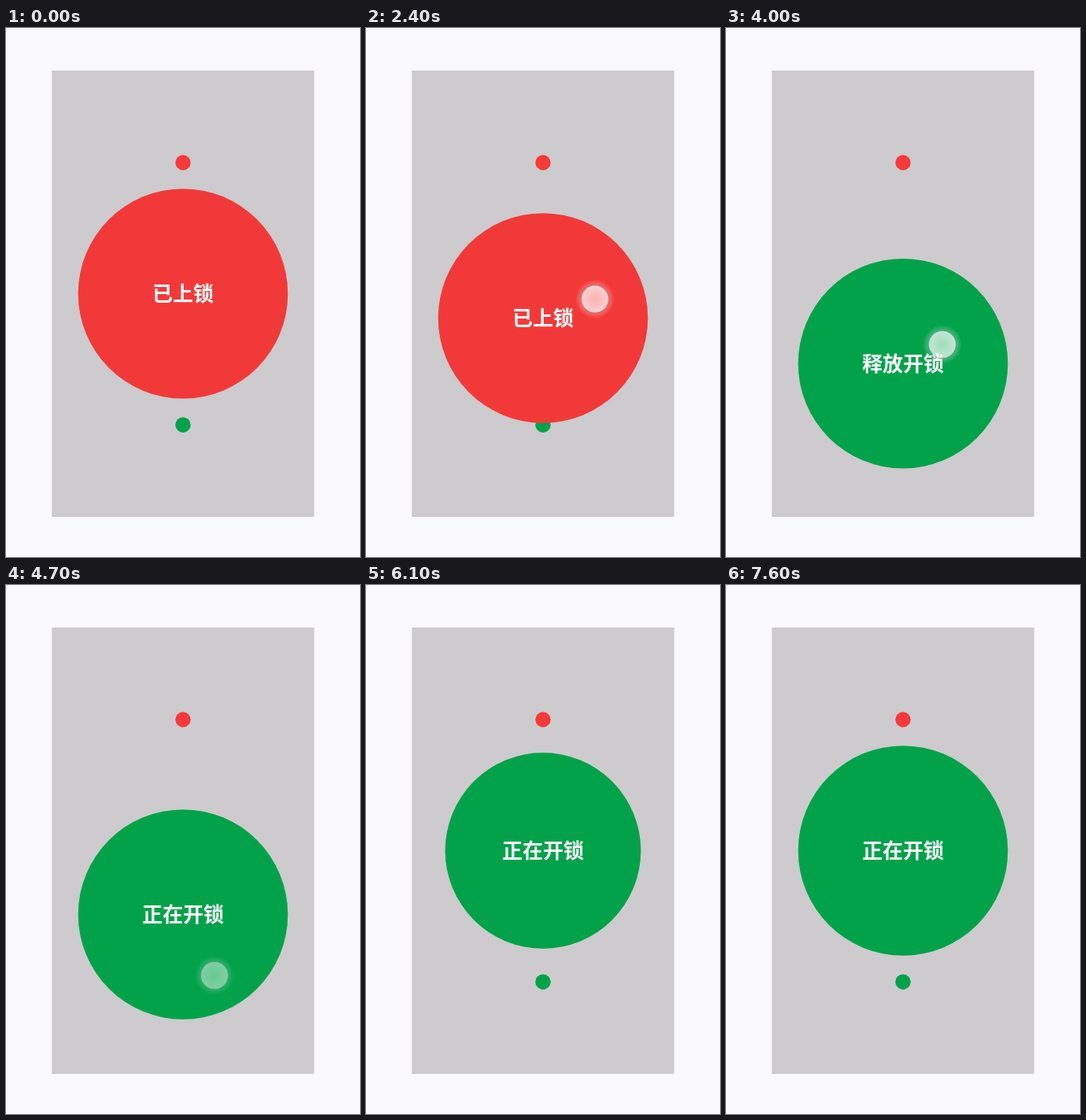
These frames come from a looping animation (450x672 px, 8 s). An HTML page with a canvas:

```html
<!DOCTYPE html>
<html lang="zh-CN">
<head>
<meta charset="utf-8">
<style>
  html, body { margin: 0; width: 450px; height: 672px; overflow: hidden; background: #faf9fc; }
  canvas { display: block; }
</style>
</head>
<body>
<canvas id="stage" width="450" height="672"></canvas>
<script>
const ctx = document.getElementById('stage').getContext('2d');

const LOOP = 8000, STEP = 100;
const RED = '#f23939', GREEN = '#02a24a';
const CX = 225, CY = 337.5, RADIUS = 133.3;
const MAX_PULL = 88.9, UNLOCK_PULL = 44.4;
const PRESS = 1700, RELEASE = 4580, RETURNED = 5200, DONE = 7600, PULSE = 600;
const GRAB_Y = 313.3; // finger height at which the pull is zero

// time, x, y
const touchPath = [
  [1700, 294, 321], [2400, 291, 344.3], [2500, 290.4, 348],
  [3400, 284, 372], [4000, 275, 402], [4600, 265, 496]
];

const clamp = (v, lo, hi) => Math.min(hi, Math.max(lo, v));
const wave = p => (1 - Math.cos(Math.PI * p)) / 2;

function fingerAt(t) {
  const time = clamp(t, touchPath[0][0], touchPath[touchPath.length - 1][0]);
  const i = touchPath.findIndex((p, n) => n > 0 && time <= p[0]);
  const [a, b] = [touchPath[i - 1], touchPath[i]];
  const k = (time - a[0]) / (b[0] - a[0]);
  return { x: a[1] + (b[1] - a[1]) * k, y: a[2] + (b[2] - a[2]) * k };
}

function pullAt(t) {
  if (t < PRESS) return 0;
  if (t < RELEASE) return clamp(fingerAt(t).y - GRAB_Y, 0, MAX_PULL);
  return MAX_PULL * (1 - wave(clamp((t - RELEASE) / (RETURNED - RELEASE), 0, 1)));
}

function radiusAt(t) {
  if (t < RETURNED || t >= DONE) return RADIUS;
  return RADIUS - 8.9 * wave((t - RETURNED) / PULSE * 2);
}

function disc(x, y, r, fill) {
  ctx.fillStyle = fill;
  ctx.beginPath();
  ctx.arc(x, y, r, 0, 2 * Math.PI);
  ctx.fill();
}

function radial(x, y, r0, r1, from, to) {
  const g = ctx.createRadialGradient(x, y, r0, x, y, r1);
  g.addColorStop(0, from);
  g.addColorStop(1, to);
  return g;
}

function drawFinger(t) {
  const alpha = 1 - clamp((t - 4600) / 250, 0, 1);
  if (t < PRESS || alpha === 0) return;
  const { x, y } = fingerAt(t);
  ctx.globalAlpha = alpha;
  disc(x, y, 25, radial(x, y, 17, 25, 'rgba(255,255,255,.28)', 'rgba(255,255,255,0)'));
  disc(x, y, 17.5, radial(x, y, 0, 17.5, 'rgba(255,255,255,.48)', 'rgba(255,255,255,.66)'));
  ctx.strokeStyle = 'rgba(90,95,130,.4)';
  ctx.lineWidth = 1.3;
  ctx.stroke();
  ctx.globalAlpha = 1;
}

function draw(t) {
  const pull = pullAt(t);
  const released = t >= RELEASE;
  const armed = released || pull >= UNLOCK_PULL;
  const label = released ? '正在开锁' : armed ? '释放开锁' : '已上锁';

  ctx.fillStyle = '#faf9fc';
  ctx.fillRect(0, 0, 450, 672);
  ctx.fillStyle = '#cdcbcd';
  ctx.fillRect(58.3, 54, 333.4, 567);

  disc(CX, CY - 166.5, 9.7, '#f73939');
  disc(CX, CY + 166.7, 9.7, GREEN);
  disc(CX, CY + pull, radiusAt(t), armed ? GREEN : RED);

  ctx.fillStyle = '#fff';
  ctx.font = 'bold 26px "Noto Sans CJK SC", "Noto Sans CJK", sans-serif';
  ctx.textAlign = 'center';
  ctx.fillText(label, CX, CY + pull + 9.9);
  drawFinger(t);
}

function tick() {
  draw(Math.floor(performance.now() % LOOP / STEP) * STEP);
  requestAnimationFrame(tick);
}
tick();
</script>
</body>
</html>
```
